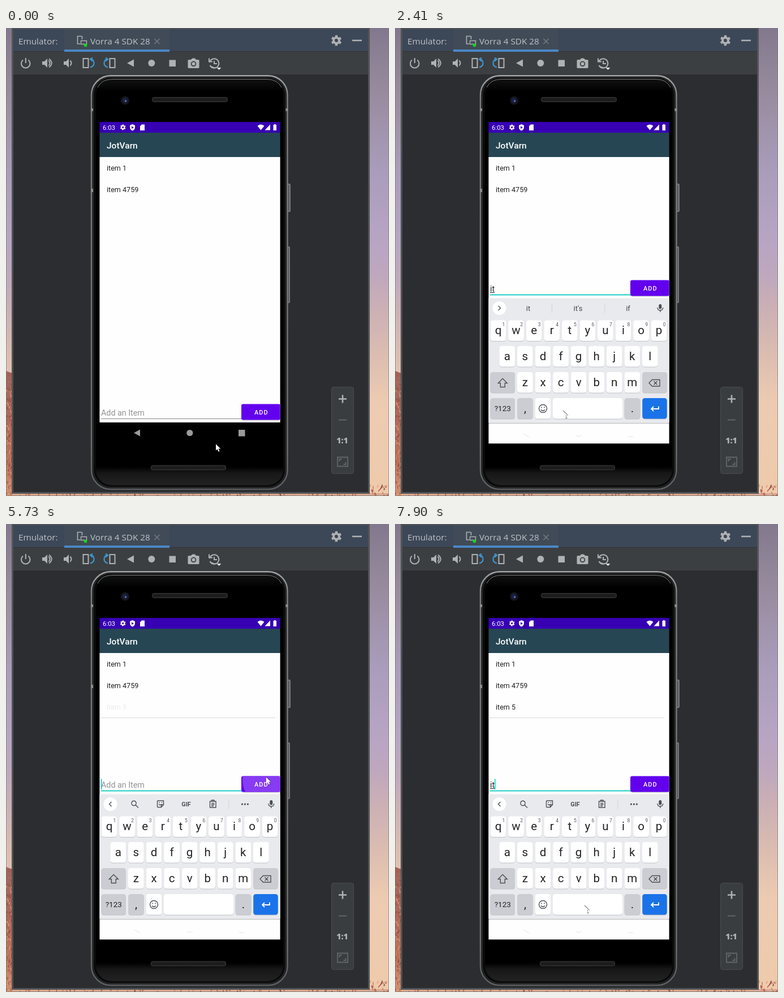
Write an HTML page that moves like this. It is 677x827 px and loops after 8000 ms.

```html
<!DOCTYPE html>
<html lang="en">
<head>
<meta charset="utf-8">
<title>Emulator demo</title>
<style>
  html, body { margin: 0; width: 100%; height: 100%; overflow: hidden; background: #2c2d31; }
  svg { display: block; width: 677px; height: 827px; font-family: Roboto, sans-serif; }
  .ui { font-family: "Open Sans", "Noto Sans", sans-serif; }
  .mid { text-anchor: middle; }
  .line { fill: none; stroke: #afb1b3; stroke-width: 2; }
  .dim { stroke: #636668; stroke-width: 1.8; }
  .grey { fill: #afb1b3; }
  .kb { fill: none; stroke: #4b4f54; stroke-width: 1.4; }
</style>
</head>
<body>
<svg viewBox="0 0 677 827">
  <defs>
    <linearGradient id="sky" x1="0" y1="0" x2="0" y2="1">
      <stop offset="0" stop-color="#82788d"/><stop offset=".13" stop-color="#978a9d"/>
      <stop offset=".3" stop-color="#a99cba"/><stop offset=".46" stop-color="#b8a5c4"/>
      <stop offset=".53" stop-color="#bfa8bd"/><stop offset=".6" stop-color="#cbb0b5"/>
      <stop offset=".7" stop-color="#dcbdb0"/><stop offset=".8" stop-color="#edcbb2"/>
      <stop offset="1" stop-color="#efcaab"/>
    </linearGradient>
    <linearGradient id="moor" x1="0" y1="0" x2="0" y2="1">
      <stop offset="0" stop-color="#9f655c"/><stop offset=".6" stop-color="#b86f58"/>
      <stop offset="1" stop-color="#d2906f"/>
    </linearGradient>
    <linearGradient id="rim" x1="0" y1="0" x2="0" y2="1">
      <stop offset="0" stop-color="#a3a6a7"/><stop offset=".06" stop-color="#7c7f80"/>
      <stop offset=".9" stop-color="#6d7071"/><stop offset="1" stop-color="#5c5f60"/>
    </linearGradient>
    <linearGradient id="glass" x1="0" y1="0" x2="0" y2="1">
      <stop offset="0" stop-color="#111"/><stop offset=".03" stop-color="#000"/>
      <stop offset=".955" stop-color="#000"/><stop offset=".97" stop-color="#171717"/>
      <stop offset="1" stop-color="#222"/>
    </linearGradient>
    <clipPath id="screen"><path d="M165.400 166h319.200v568.400h-319.200z"/></clipPath>
    <clipPath id="btn"><rect x="416" y="664.500" width="69" height="28" rx="3"/></clipPath>
    <g id="gear" fill="none" stroke="currentColor" transform="rotate(-105.800)">
      <circle r="5" stroke-width="4"/>
      <circle r="7.800" stroke-width="3" stroke-dasharray="4.300 3.868"/>
    </g>
    <path id="speaker" class="grey" d="M-9-3h4l5-5v16l-5-5h-4z"/>
    <g id="nav">
      <path d="M226 715.500l11-6v12z"/><circle cx="324.800" cy="715.500" r="5.600"/>
      <path d="M411 710h11.500v11.500h-11.500z"/>
    </g>
  </defs>

  <path fill="url(#sky)" d="M0 0h677v827H0z"/>
  <g id="grass"></g>
  <path fill="none" stroke="#777" stroke-opacity=".7" d="M.5 0v826.500h676V0"/>

  <!-- tool window -->
  <path fill="#515456" d="M10 0h633v823H10z"/>
  <path fill="#2c2d31" d="M13 82h627v738H13z"/>
  <path fill="#3c4757" d="M13 2h627v39H13z"/>
  <path fill="#414b57" d="M103 2h186v39H103z"/>
  <path fill="#4a88c7" d="M103 38h186v4H103z"/>
  <path fill="#3c3f41" d="M13 42h627v40H13z"/>
  <path fill="#323437" d="M13 41h90v1H13zM289 41h351v1H289z"/>
  <g class="ui" font-size="15.300" fill="#bfc3c7">
    <text x="22" y="28.700">Emulator:</text>
    <text x="149" y="28.700">Vorra 4 SDK 28</text>
  </g>
  <g class="line">
    <path d="M134 14.500h-7.500V28h4.500M134.500 14.500V20" stroke-width="1.600"/>
    <path d="M132.500 22.500h10v6h-10z" stroke-width="1.400"/>
    <path d="M262.500 19l9 9m0-9l-9 9" stroke="#78818b" stroke-width="1.200"/>
    <path d="M612 22h17" stroke-width="2.600"/>
  </g>
  <circle cx="140.500" cy="30.500" r="2.800" fill="#0be00b"/>
  <use href="#gear" x="0" y="0" transform="translate(584 22)" color="#afb1b3"/>

  <!-- toolbar -->
  <path class="line" d="M30 56.500a7.800 7.800 0 1 0 9.500 0M34.800 53v9"/>
  <use href="#speaker" x="73" y="62"/>
  <path class="line" d="M75.500 57.500q4 4.500 0 9M76 54.500q9.500 7.500 0 15"/>
  <use href="#speaker" x="111" y="62"/>
  <path class="line" d="M113.500 57.500q4 4.500 0 9"/>
  <path class="line" d="M136.500 54h9v16h-9zM183.500 54h9v16h-9z"/>
  <g id="turn" fill="none" stroke="#3c95cf" stroke-width="2.200">
    <path d="M149 69.500q7-2 6.500-8t-5.500-6.500M153 52.500l-4 2.700 4 3.500"/>
  </g>
  <use href="#turn" transform="matrix(-1 0 0 1 329 0)"/>
  <path class="grey" d="M214 62l12-6.500v13zM288.500 56.500h11.500v11.500h-11.500z"/>
  <circle class="grey" cx="257.300" cy="62" r="6"/>
  <path class="grey" fill-rule="evenodd" d="M323 56h4l2-2.500h5l2 2.500h4q1.500 0 1.500 1.500v12q0 1.500-1.500 1.500h-17q-1.500 0-1.500-1.500v-12q0-1.500 1.500-1.500zM331.500 58.500a4.800 4.800 0 1 0 .01 0z"/>
  <circle class="grey" cx="331.500" cy="63.300" r="3"/>
  <path class="line" d="M360.500 66a8.300 8.300 0 1 0 0-7M359 53.500v6h6M368 58v5h5M363 68q4 3 8 2"/>
  <path fill="#e3e4e5" d="M372.500 70h8l-4 4z"/>

  <!-- zoom panel -->
  <rect x="575.500" y="634.500" width="39" height="153" rx="4" fill="#3a3d3f" stroke="#4a4d4f"/>
  <path class="line" style="stroke-width:2.600" d="M588 655.500h14M595 648.500v14"/>
  <path class="line dim" d="M588 692.500h14"/>
  <text class="ui mid grey" x="594.500" y="734" font-size="14" font-weight="800">1:1</text>
  <path class="line dim" d="M586 758.500h18v16h-18zM589.500 766v-4h4M600.500 767v4h-4"/>

  <!-- phone -->
  <path fill="#77797a" d="M497 275h4q2 0 2 2v46q0 2-2 2h-4zM497 386h3q2 0 2 2v96q0 2-2 2h-3z"/>
  <path fill="#4a4c4d" d="M498.500 277h2v46h-2zM498.500 388h1.500v96h-1.500z"/>
  <rect x="151" y="84.200" width="346.500" height="730.800" rx="34" fill="#1d1e1f" stroke="url(#rim)" stroke-width="2.400"/>
  <path fill="#8a8c8d" d="M150 142h5v5h-5zM494 142h4.500v5h-4.500zM150 284h4v6h-4z"/>
  <rect x="154.500" y="87.500" width="339.500" height="724" rx="31" fill="#0a0a0a" stroke="#303132"/>
  <rect x="159" y="91" width="331" height="717" rx="28" fill="url(#glass)"/>
  <path fill="none" stroke="#808384" d="M162 105q7-14.500 26-14.500h273q19 0 26 14.500"/>
  <circle cx="210.500" cy="128" r="7.500" fill="#15161c"/>
  <circle cx="210.500" cy="128" r="4.500" fill="#1b2140"/>
  <circle cx="211.500" cy="129" r="1.500" fill="#6f82d2"/>
  <g fill="#202020" stroke="#393939">
    <rect x="258.500" y="122.500" width="133" height="8" rx="3"/>
    <rect x="256.500" y="773" width="132" height="8" rx="3"/>
  </g>
  <path stroke="#111" stroke-width="3" stroke-dasharray="1 2" d="M262 126.500h126M260 777h125"/>

  <!-- app -->
  <g clip-path="url(#screen)">
    <path fill="#fefefe" d="M165 228h320v469H165z"/>
    <path fill="#3700b3" d="M165 166h320v19H165z"/>
    <path fill="#274653" d="M165 185h320v43H165z"/>
    <g fill="#fff">
      <text x="171" y="179.700" font-size="11.400">6:03</text>
      <use href="#gear" transform="translate(206.700 175.500) scale(.53)" color="#fff"/>
      <path fill-rule="evenodd" d="M223.500 170l4.500 2v3.500q0 4-4.500 6-4.500-2-4.500-6V172zM222 173.500v4.500l4-2.200z"/>
      <path d="M240 170.500h5v10.500h-8v-7.500z"/>
      <path d="M444.500 173q6-5 12 0l-6 7.500zM467 170.500v10h-9.500zM474 170h2.500v1h1.500v10h-5.500v-10h1.500z"/>
      <text x="178" y="212.700" font-size="15.500" font-weight="500">JotVarn</text>
    </g>
    <g font-size="12.600" fill="#222">
      <text x="178" y="251.800">item 1</text>
      <text x="178" y="290">item 4759</text>
      <text id="added" x="178" y="328.200">item 5</text>
    </g>
    <path id="rule" stroke="#dadada" d="M165 342.500h311"/>

    <g id="row">
      <text id="hint" x="168" y="684.700" font-size="14.300" fill="#939393">Add an Item</text>
      <text id="typed" x="168" y="684.700" font-size="14.300" fill="#222"></text>
      <path id="mark" stroke="#222" d=""/>
      <path id="edge" d="M168 690.500h249"/>
      <path id="caret" stroke="#03d3c0" stroke-width="1.600" d=""/>
      <path fill="#c9c9c9" d="M418 692h65v1.500h-65z"/>
      <g clip-path="url(#btn)">
        <path fill="#6200ee" d="M416 664h69v29h-69z"/>
        <circle id="ripple" cx="461" cy="672" r="43" fill="#873bf2"/>
      </g>
      <text class="mid" x="451.300" y="682.700" font-size="11" font-weight="500" letter-spacing="1" fill="#fff">ADD</text>
    </g>

    <path d="M165 697h320v38H165z"/>
    <use href="#nav" fill="#9b9b9b"/>

    <g id="keyboard">
      <path fill="#e9eaee" d="M165 477.500h320v221H165z"/>
      <path fill="#fefefe" d="M165 698.500h320v36H165z"/>
      <path class="kb" style="stroke:#e2e2e2;stroke-width:1" d="M227 717l10 5.500M320 719.500q5 4 10 0M412 722h10"/>
      <circle cx="184.500" cy="495" r="12" fill="#fff"/>
      <path id="chevron" class="kb"/>
      <g id="tools">
        <path class="kb" d="M226 489.300a4.200 4.200 0 1 0 .01 0zM229 496.500l5 5"/>
        <path class="kb" d="M268.500 489h10v7l-4 4.500h-6q-1 0-1-1v-9.500q0-1 1-1zM279 496h-4.500v4.500M270 495q2.500 3 5 0M271 491.500v1.500M275.500 491.500v1.500"/>
        <text class="mid" x="318.500" y="498.700" font-size="10.800" font-weight="700" fill="#4b4f54">GIF</text>
        <path class="kb" d="M360.500 490h10.500v11h-10.500zM363.500 490v-2h4.500v2M363 493.500h5.500M363 496h5.500M363 498.500h4"/>
        <path stroke="#cfd1d4" d="M394 486.500v17"/>
        <path fill="#4b4f54" d="M416 493.800h2.800v2.800H416zM421 493.800h2.800v2.800H421zM426 493.800h2.800v2.800H426z"/>
      </g>
      <g id="words" class="mid" font-size="13" fill="#44484d">
        <text x="235.500" y="500"></text><text x="323.500" y="500"></text><text x="412" y="500"></text>
        <path stroke="#cfd1d4" d="M277.500 486.500v17M371 486.500v17"/>
      </g>
      <rect x="466.300" y="488" width="5" height="8.500" rx="2.500" fill="#4b4f54"/>
      <path class="kb" d="M464 494q0 5 4.800 5t4.800-5M468.800 499v3"/>
      <g id="keys"></g>
      <path class="kb" d="M190.300 619.500l8 8h-4v7h-8v-7h-4zM454.500 621.500h13.500v11.500H454.500l-5.500-5.700zM457.500 624.300l6 6m0-6l-6 6"/>
      <circle class="kb" cx="261.500" cy="672.500" r="7"/>
      <path class="kb" d="M258 674.500q3.500 4 7 0M259 669.500v2M264 669.500v2"/>
      <path fill="none" stroke="#fff" stroke-width="1.800" d="M466 668.500v4.500h-12.500M457 669l-4 4 4 4"/>
    </g>
    <g id="shade">
      <path fill-opacity=".2" d="M165 697h320v38H165z"/>
      <use href="#nav" fill="#eaeaea"/>
    </g>
  </g>

  <g id="pointer">
    <path fill="#fff" d="M0 0v11.500l2.600-2.300 2 4.600 2-.9-2-4.500H8.300z"/>
    <path fill="none" stroke="#222" stroke-width=".9" d="M0 0l8.600 8.400M4.700 9.500h1.600M6 11.500l1 2M4.600 13.800h1.600"/>
  </g>
</svg>

<script>
const $ = id => document.getElementById(id);
const LOOP = 8000, LIFT = -219, TEXT_X = 168;

// Wallpaper foliage along the left and bottom edges
let seed = 11;
const rand = () => (seed = seed * 16807 % 2147483647) / 2147483647;
const rusts = ['#a5574a', '#c07a62', '#8d5048', '#d99c7e', '#b0604c'];
const blade = (x, y) => `<path stroke="${rusts[rand() * rusts.length | 0]}" stroke-width="1.5"
  d="M${x} ${y}l${rand() * 6 - 3} ${-2 - rand() * 4}"/>`;
let grass = '<path fill="url(#moor)" d="M0 606l11 4v217H0z"/><path fill="#d9a890" d="M11 822h666v5H11z"/>';
for (let i = 0; i < 130; i++) grass += blade(rand() * 11, 612 + rand() * 218);
for (let i = 0; i < 90; i++) grass += blade(rand() * 677, 825 + rand() * 5);
for (let i = 0; i < 25; i++) grass += blade(643 + rand() * 34, 808 + rand() * 22);
$('grass').innerHTML = grass;

// Keys
function key(cx, y, w, label = '', fill = '#fff', size = 20.5) {
  return `<rect x="${cx - w / 2}" y="${y + 1}" width="${w}" height="36.5" rx="4.5" fill="#bfc1c5"/>
    <rect x="${cx - w / 2}" y="${y}" width="${w}" height="36.5" rx="4.5" fill="${fill}"/>
    <text class="mid" x="${cx}" y="${y + 18 + size * .34}" font-size="${size}" fill="#222">${label}</text>`;
}
const GREY = '#cbcdd2', PITCH = 31.57;
let keys = '';
[['qwertyuiop', 182.5, 516.5], ['asdfghjkl', 198.3, 562], ['zxcvbnm', 229.9, 608]].forEach(([row, x0, y], r) => {
  [...row].forEach((ch, i) => {
    const x = x0 + i * PITCH;
    keys += key(x, y, 27.8, ch);
    if (!r) keys += `<text class="mid" x="${x + 9.5}" y="526.500" font-size="8.500" fill="#555">${(i + 1) % 10}</text>`;
  });
});
keys += key(190.3, 608, 43.5, '', GREY) + key(459, 608, 43.5, '', GREY)
  + key(190.3, 654, 43.5, '?123', GREY, 13.5) + key(230, 654, 27.8, ',', GREY)
  + key(261.5, 654, 27.8) + key(340.5, 654, 123) + key(419.5, 654, 27.8, '.', GREY)
  + key(459, 654, 43.5, '', '#1a73e8');
$('keys').innerHTML = keys;

// Each step overrides the state before it. kb: keyboard drop in px, null when closed.
const steps = [
  { t: 0, at: [371, 735], text: '', caret: 0, focus: 0, up: 0, kb: null, words: null, ul: 0, fade: 0, press: 0 },
  { t: 160, at: [367, 729] }, { t: 290, at: [354, 715] }, { t: 420, at: [335, 699] },
  { t: 560, at: [314, 685] }, { t: 700, at: [297, 676] },
  { t: 840, focus: 1, caret: 1 },
  { t: 1240, up: 1, kb: 59.5, caret: 0 },
  { t: 1370, kb: 0 },
  { t: 1670, text: 'it', ul: 2, caret: 1, words: ['it', "it's", 'if'] },
  { t: 2410, caret: 0 },
  { t: 2540, text: 'ite', caret: 1 },
  { t: 2840, text: 'item', ul: 3, words: ['ite', 'item', 'items'] },
  { t: 3120, ul: 4, words: ['item', 'Item', 'items'] },
  { t: 3550, caret: 0 },
  { t: 3850, text: 'item ', caret: 1 },
  { t: 4130, ul: 0, words: ['is', 'number', 'to'] },
  { t: 4280, text: 'item 5', words: ['', '5', ''] },
  { t: 4560, words: null },
  { t: 4840, at: [322, 645], caret: 0 }, { t: 4990, at: [392, 560] },
  { t: 5140, at: [470, 466] }, { t: 5290, at: [511, 428], caret: 1 }, { t: 5440, at: [460, 447] },
  { t: 5730, text: '', fade: .08, press: 1 },
  { t: 5880, fade: .55, up: 0, kb: 110 },
  { t: 6030, fade: 1, kb: null, press: 0 },
  { t: 6460, at: [472, 460], caret: 0 }, { t: 6600, at: [481, 505] }, { t: 6740, at: [452, 570] },
  { t: 6880, at: [400, 630], caret: 1 }, { t: 7030, at: [352, 665] }, { t: 7170, at: [335, 674] },
  { t: 7470, up: 1, kb: 59.5 },
  { t: 7600, kb: 0 },
  { t: 7770, text: 'i', ul: 1 },
  { t: 7900, text: 'it', ul: 2 }
];
for (let i = 1; i < steps.length; i++) steps[i] = { ...steps[i - 1], ...steps[i] };

const advance = { i: .243, t: .327, e: .53, m: .876, ' ': .248, 5: .562 };
const textEnd = s => [...s].reduce((x, ch) => x + advance[ch] * 14.3, TEXT_X);
const set = (id, name, value) => $(id).setAttribute(name, value);
const show = (id, on) => { $(id).style.display = on ? '' : 'none'; };

function draw(s) {
  set('pointer', 'transform', `translate(${s.at})`);
  set('row', 'transform', `translate(0 ${s.up ? LIFT : 0})`);
  show('hint', !s.text);
  $('typed').textContent = s.text;
  set('mark', 'd', s.ul ? `M168 686.500H${textEnd(s.text.slice(0, s.ul))}` : '');
  set('edge', 'stroke', s.focus ? '#1fd0c4' : '#858585');
  set('edge', 'stroke-width', s.focus ? 2 : 1);
  set('caret', 'd', s.caret ? `M${textEnd(s.text) + .6} 669.500v18.500` : '');
  show('ripple', s.press);
  set('added', 'opacity', s.fade);
  show('rule', s.fade);
  show('keyboard', s.kb !== null);
  set('keyboard', 'transform', `translate(0 ${s.kb || 0})`);
  show('shade', s.kb > 0);
  show('tools', !s.words);
  show('words', s.words);
  set('chevron', 'd', s.words ? 'M182.500 491l4 4-4 4' : 'M186.500 491l-4 4 4 4');
  if (s.words) $('words').querySelectorAll('text').forEach((el, i) => { el.textContent = s.words[i]; });
}

let current;
const start = performance.now();
function tick() {
  const t = (performance.now() - start) % LOOP;
  const step = steps.findLast(s => s.t <= t) || steps[0];
  if (step !== current) draw(current = step);
  requestAnimationFrame(tick);
}
tick();
</script>
</body>
</html>
```
